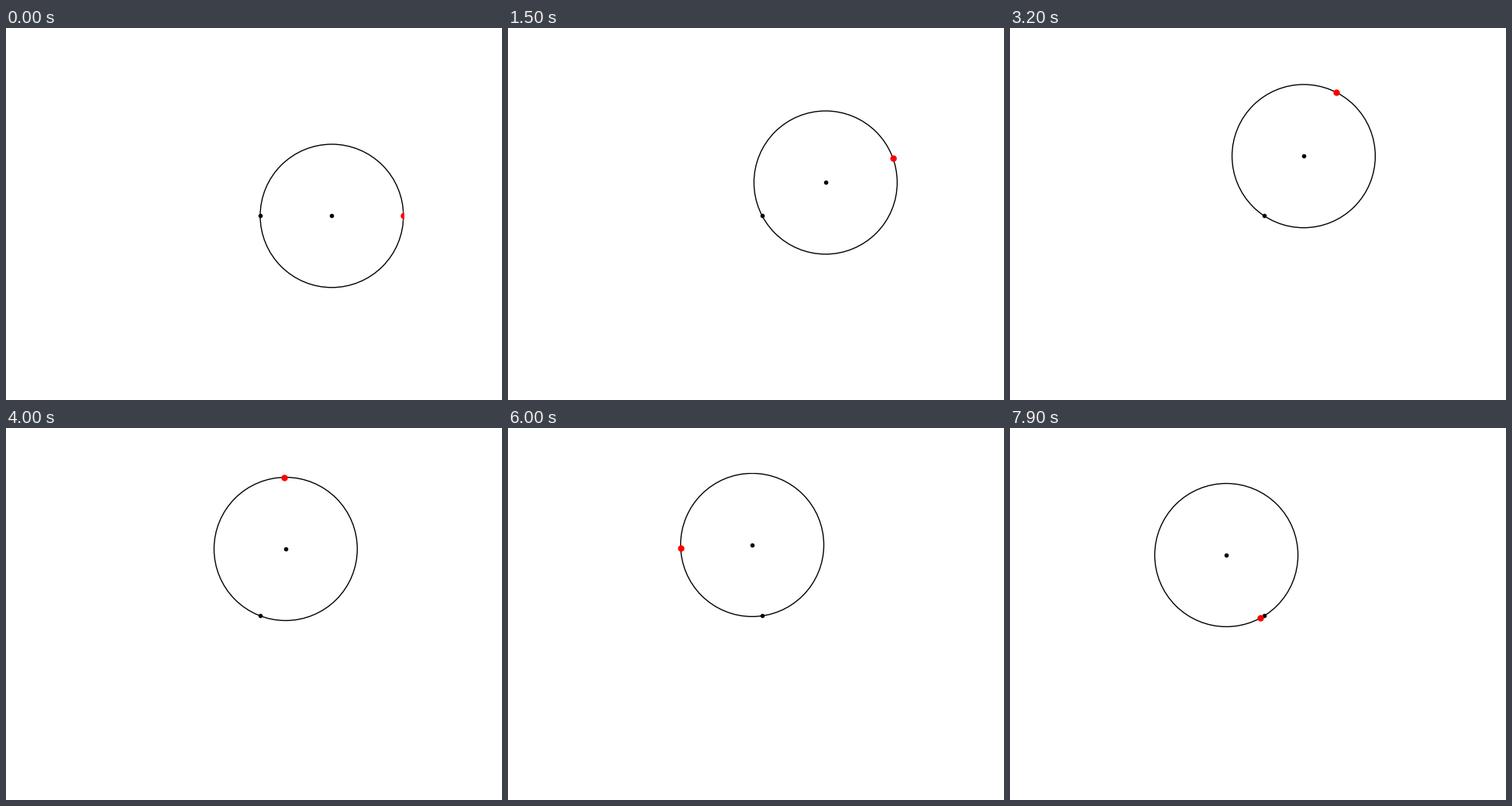
These frames come from a looping animation (640 px wide and 480 px high, 8000 ms). A matplotlib script:

```python
import numpy as np
import matplotlib.pyplot as plt
from matplotlib.animation import FuncAnimation
from matplotlib.patches import Circle

FRAMES, INTERVAL = 80, 100

fig, ax = plt.subplots(figsize=(6.4, 4.8), dpi=100)
ax.set_aspect("equal")
ax.set(xlim=(-2, 2), ylim=(-2, 2))
ax.axis("off")

ring = ax.add_patch(Circle((1, 0), 1, fill=False, ec="black", lw=1))
ax.plot([0], [0], "ko", ms=3)  # fixed pivot
hub, = ax.plot([], [], "ko", ms=3)
bead, = ax.plot([], [], "ro", ms=5)


def turn(n, speed, accel):
    """Unit vector after n steps of uniformly accelerated rotation (degrees)."""
    a = np.radians(speed * n + accel * n * n / 2)
    return np.array([np.cos(a), np.sin(a)])


def update(n):
    center = turn(n, 1.92, -0.00954)
    x, y = center + turn(n, 0.74, 0.0768)
    ring.center = center
    hub.set_data([center[0]], [center[1]])
    bead.set_data([x], [y])
    return ring, hub, bead


anim = FuncAnimation(fig, update, frames=FRAMES, interval=INTERVAL,
                     repeat=True, repeat_delay=0)
plt.show()
```
